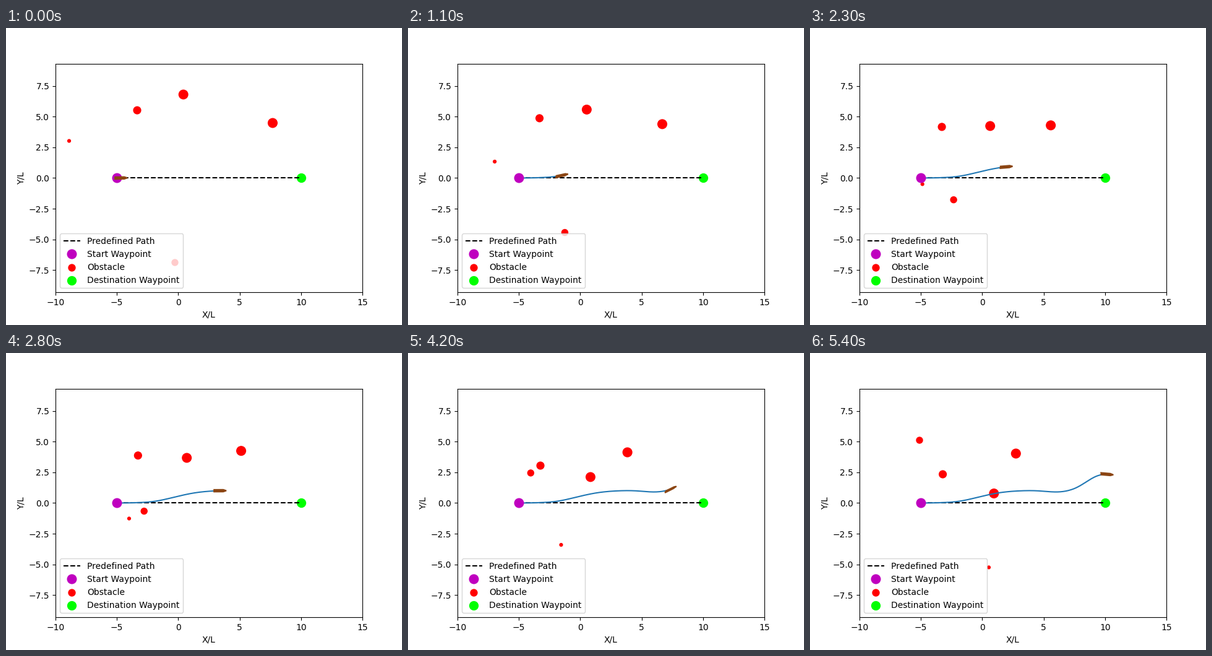
Write a matplotlib script that moves like this. It is 640 px wide and 480 px high and loops after 5.5 s.

```python
import numpy as np
import matplotlib.pyplot as plt
from matplotlib.animation import FuncAnimation

FRAMES = 55
START, GOAL = -5, 10
SPEED = 0.288         # ship lengths per step
BRAKE_STEP = 37       # the ship slows down evenly from here on
BRAKE = 0.0025
LOOK_AHEAD = 0.35     # the hull points towards the path in front of it

# Heights of the route at even distances from the start
STEP = 1.6
HEIGHTS = np.array([0, 0.025, 0.155, 0.505, 0.835, 0.985,
                    0.985, 0.903, 1.315, 2.22, 2.27])
END_SLOPE = -0.12

# Obstacles drift in straight lines: from x, y, to x, y, size
OBSTACLES = np.array([
    (-8.89, 3.02, 0.535, -5.245, 12),
    (-3.347, 5.514, -3.216, 2.339, 72),
    (0.418, 6.8, 0.953, 0.776, 110),
    (7.69, 4.48, 2.742, 4.027, 112),
    (-0.272, -6.885, -5.111, 5.111, 52)])

HULL = np.array([(-0.5, -0.085), (-0.5, 0.085), (0.25, 0.085),
                 (0.5, 0), (0.25, -0.085)])


def spline_slopes(y, h, last):
    """Slopes of the cubic spline that starts level and ends at slope last."""
    n = len(y)
    m = 4 * np.eye(n) + np.eye(n, k=1) + np.eye(n, k=-1)
    m[0], m[-1] = np.eye(n)[0], np.eye(n)[-1]
    rhs = np.r_[0, 3 * (y[2:] - y[:-2]) / h, last]
    return np.linalg.solve(m, rhs)


SLOPES = spline_slopes(HEIGHTS, STEP, END_SLOPE)


def route(x):
    u = (np.asarray(x) - START) / STEP
    i = np.clip(u.astype(int), 0, len(HEIGHTS) - 2)
    t = u - i
    s = 1 - t
    return (s * s * ((1 + 2 * t) * HEIGHTS[i] + t * STEP * SLOPES[i])
            + t * t * ((1 + 2 * s) * HEIGHTS[i + 1] - s * STEP * SLOPES[i + 1]))


def ship_x(n):
    return -4.65 + SPEED * n - BRAKE * max(0, n - BRAKE_STEP) ** 2


def hull_at(x):
    ahead, d = x + LOOK_AHEAD, 0.1
    a = np.arctan2(route(ahead + d) - route(ahead - d), 2 * d)
    c, s = np.cos(a), np.sin(a)
    return HULL @ np.array([(c, s), (s, c)]) + (x, route(x))


def obstacles_at(n):
    a, b = OBSTACLES[:, :2], OBSTACLES[:, 2:4]
    return a + (b - a) * n / (FRAMES - 1)


fig, ax = plt.subplots(figsize=(6.4, 4.8), dpi=100)
ax.plot([START, GOAL], [0, 0], "k--", label="Predefined Path")
trail, = ax.plot([], [], color="C0")
ax.plot(START, 0, "mo", ms=10, mew=1.5, label="Start Waypoint")
obstacles = ax.scatter(*obstacles_at(0).T, s=OBSTACLES[:, 4], color="r",
                       label="Obstacle")
ax.scatter(GOAL, 0, s=100, color="lime", label="Destination Waypoint")
ship, = ax.fill(*hull_at(ship_x(0)).T, color="saddlebrown", lw=1.5, zorder=3)

half = 25 * 369.6 / 496 / 2  # equal scale on both axes
ax.set(xlim=(-10, 15), ylim=(-half, half), xlabel="X/L", ylabel="Y/L")
ax.set_xticks(range(-10, 16, 5))
ax.legend(loc="lower left")


def draw(n):
    x = ship_x(n)
    xs = np.linspace(START, x, 200)
    trail.set_data(xs, route(xs))
    ship.set_xy(hull_at(x))
    obstacles.set_offsets(obstacles_at(n))
    return trail, ship, obstacles


anim = FuncAnimation(fig, draw, frames=FRAMES, interval=100, repeat=True)
plt.show()
```
